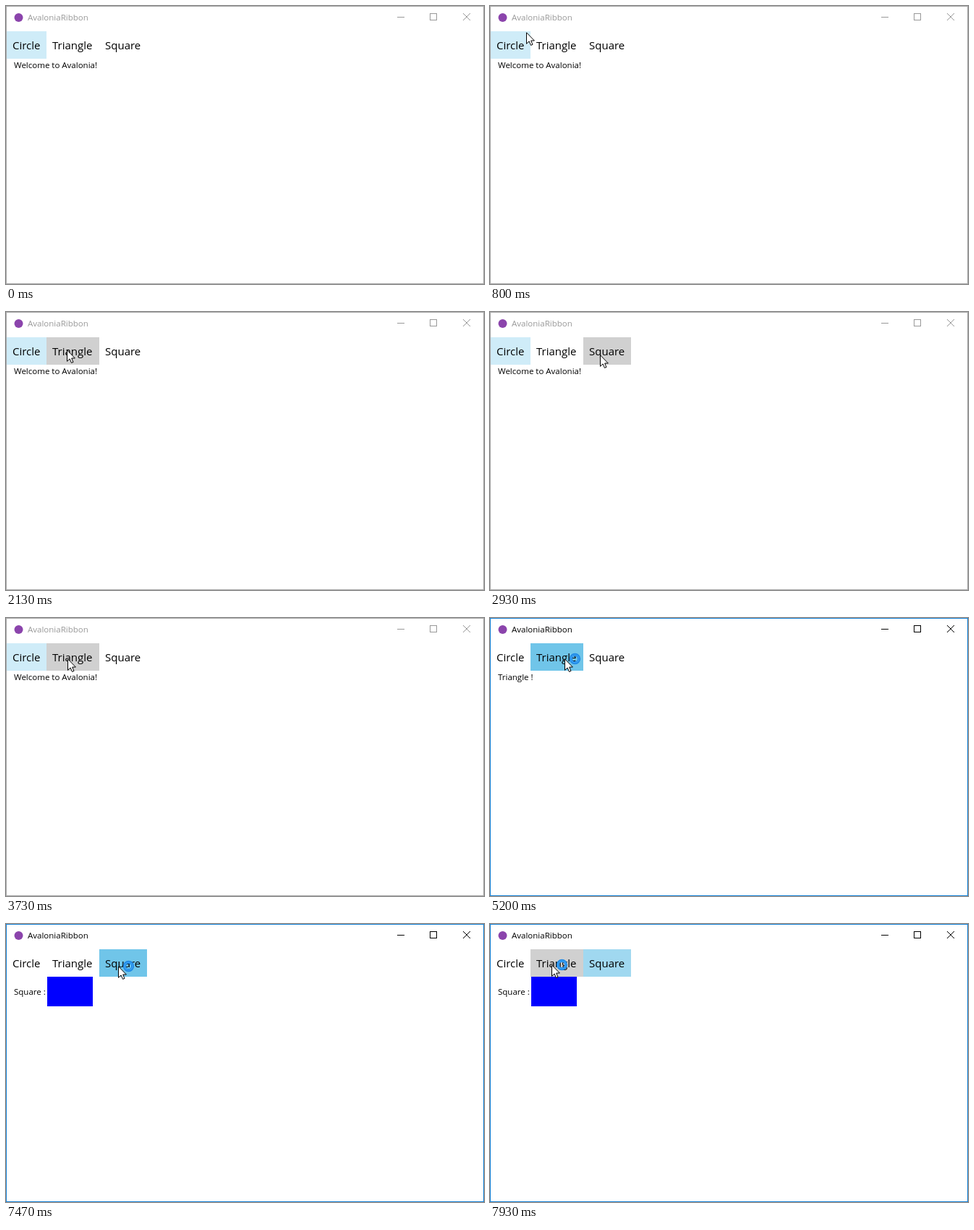
Animation, 661 px wide and 385 px high, one loop 8 s. Source, as an HTML page:

```html
<!DOCTYPE html>
<html lang="en">
<head>
<meta charset="utf-8">
<title>AvaloniaRibbon</title>
<style>
html, body { margin: 0; width: 100%; height: 100%; overflow: hidden; background: #fff; }
svg { display: block; font-family: "Open Sans", "Noto Sans", sans-serif; }
.tab { font-size: 15px; }
.small { font-size: 11.5px; }
.crisp { shape-rendering: crispEdges; }
</style>
</head>
<body>
<svg width="661" height="385" viewBox="0 0 661 385">
  <rect width="661" height="385" fill="#fff"/>
  <rect id="frame" class="crisp" x=".5" y=".5" width="660" height="384" fill="none"/>
  <circle cx="17.5" cy="16" r="6" fill="#8b44ac"/>
  <text id="title" class="small" x="30" y="20">AvaloniaRibbon</text>
  <g id="buttons" fill="none">
    <path class="crisp" d="M541 15.5h10M586.5 10.5h9v9h-9z"/>
    <path d="M632 10l10 10M642 10l-10 10"/>
  </g>
  <g id="tabs"></g>
  <text id="label" class="small" x="11"></text>
  <rect id="square" x="57" y="73" width="63" height="41" fill="#00f"/>
  <g id="cursor">
    <path d="M.5 .8V16.3L4.1 12.9 6.5 18.4 9 17.4 6.7 12H11.4Z" fill="#fff" stroke="#000"/>
    <g id="busy" fill="none">
      <circle cx="14.5" cy=".5" r="5.6" stroke="#1f8ae6" stroke-width="4.2"/>
      <circle cx="14.5" cy=".5" r="5.4" stroke="#3fa2f2" stroke-width="1.4"/>
    </g>
  </g>
</svg>
<script>
const LOOP = 8000, RATE = 15;
const ACTIVATE = 61, BUSY = 62, PICK_SQUARE = 96;
const $ = id => document.getElementById(id);

const TABS = [
  { name: "Circle", x: 1, end: 56 },
  { name: "Triangle", x: 56, end: 129 },
  { name: "Square", x: 129, end: 195 }
];

// Pointer path: tick, x, y
const PATH = [
  [3, 164, 8], [12, 50, 36], [15, 34, 50], [18, 28, 56], [20, 28, 56],
  [21, 30, 58], [24, 30, 58], [32, 84, 52], [37, 112, 55], [38, 131, 56],
  [44, 152, 59], [46, 152, 59], [56, 85, 56], [69, 85, 56], [78, 103, 56],
  [82, 123, 56], [83, 128, 56], [84, 128, 56], [85, 132, 56], [87, 145, 57],
  [91, 158, 58], [111, 158, 58], [119, 85, 56]
];

function make(tag, attrs, parent) {
  const el = document.createElementNS("http://www.w3.org/2000/svg", tag);
  for (const key in attrs) el.setAttribute(key, attrs[key]);
  return parent.appendChild(el);
}

for (const tab of TABS) {
  tab.box = make("rect", { x: tab.x, y: 35, width: tab.end - tab.x, height: 38 }, $("tabs"));
  make("text", { x: tab.x + 8, y: 60, class: "tab" }, $("tabs")).textContent = tab.name;
}

function slope(i, axis) {
  const a = PATH[i], b = PATH[i + 1];
  return a && b ? (b[axis] - a[axis]) / (b[0] - a[0]) : 0;
}

// Monotone tangent: zero at stops and turns
function tangent(i, axis) {
  const a = slope(i - 1, axis), b = slope(i, axis);
  if (i === 0) return b;
  return a * b > 0 ? 2 * a * b / (a + b) : 0;
}

function pointAt(tick) {
  let i = 0;
  while (i < PATH.length - 2 && PATH[i + 1][0] <= tick) i++;
  const a = PATH[i], b = PATH[i + 1], span = b[0] - a[0];
  const u = Math.min(1, Math.max(0, (tick - a[0]) / span)), v = 1 - u;
  return [1, 2].map(k => Math.round(
    v * v * (1 + 2 * u) * a[k] + u * u * (3 - 2 * u) * b[k] +
    span * u * v * (v * tangent(i, k) - u * tangent(i + 1, k))));
}

function tabColor(selected, hover, focused) {
  if (!selected) return hover ? "#d0d0d0" : "#fff";
  return ["#cfecf8", "#a0d8f0", "#70c5e9"][hover + focused];
}

function show(el, on) {
  el.setAttribute("visibility", on ? "visible" : "hidden");
}

function render(ms) {
  const tick = Math.floor((ms + 5) * RATE / 1000);
  const active = tick >= ACTIVATE, squarePicked = tick >= PICK_SQUARE;
  const picked = squarePicked ? 2 : active ? 1 : 0;
  const visible = tick >= PATH[0][0];
  const [x, y] = pointAt(tick);

  $("frame").setAttribute("stroke", active ? "#1883d7" : "#aaa");
  $("title").setAttribute("fill", active ? "#000" : "#999");
  $("buttons").setAttribute("stroke", active ? "#000" : "#999");

  TABS.forEach((tab, i) => {
    const hover = visible && y > 36 && y < 73 && x >= tab.x && x < tab.end;
    tab.box.setAttribute("fill", tabColor(i === picked, hover, active));
  });

  $("label").textContent = ["Welcome to Avalonia!", "Triangle !", "Square :"][picked];
  $("label").setAttribute("y", squarePicked ? 98 : 86);
  show($("square"), squarePicked);

  $("cursor").setAttribute("transform", `translate(${x} ${y})`);
  $("cursor").setAttribute("display", visible ? "inline" : "none");
  show($("busy"), tick >= BUSY);
}

const start = performance.now();
function loop() {
  render((performance.now() - start) % LOOP);
  requestAnimationFrame(loop);
}
loop();
</script>
</body>
</html>
```
